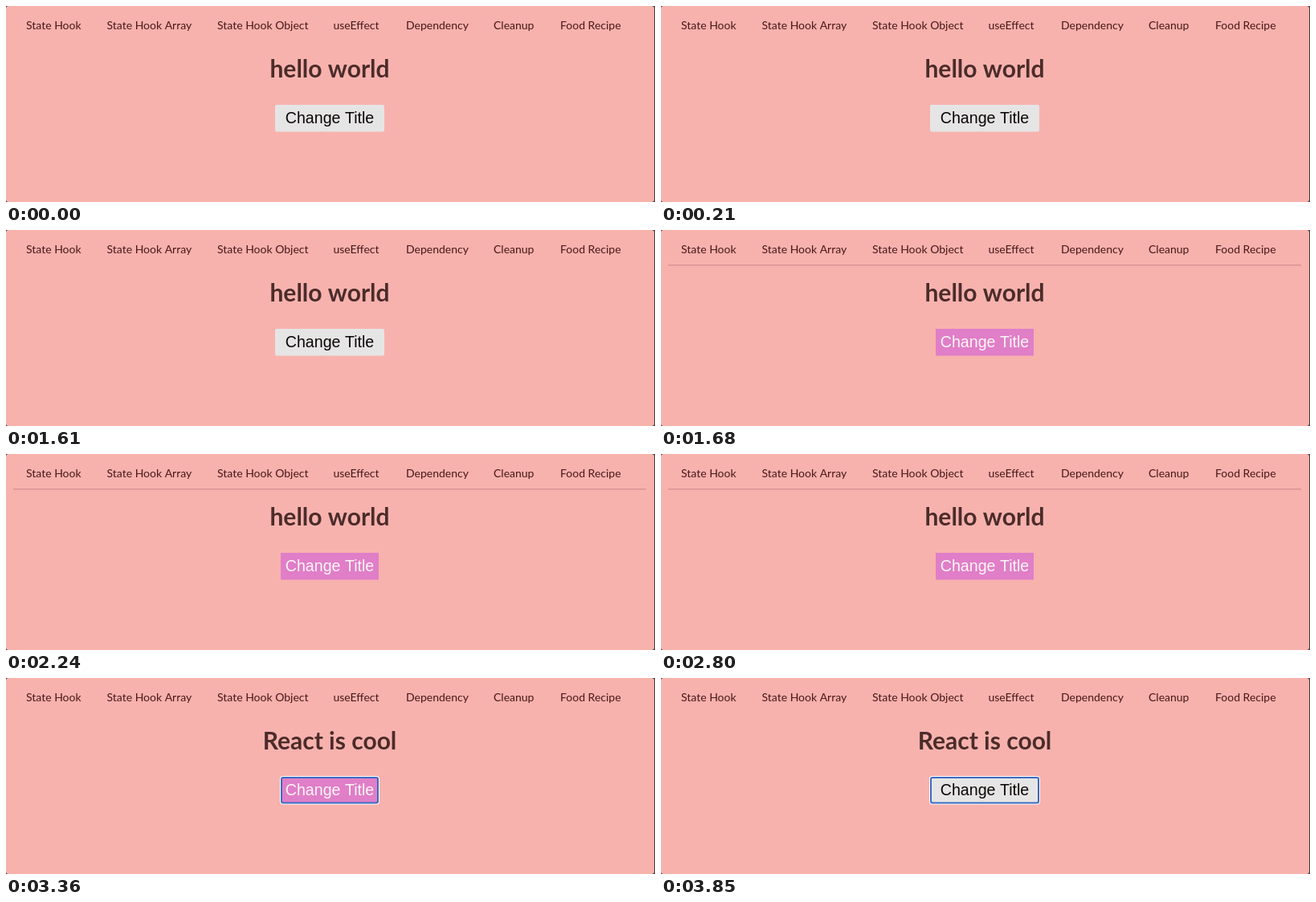
Recreate the animation shown at these times as an HTML page with a canvas. Size 808 by 244 pixels, loop 4.06 s.

```html
<!DOCTYPE html>
<html lang="en">
<head>
<meta charset="utf-8">
<title>Change Title</title>
<style>
  html, body { margin: 0; width: 100%; height: 100%; overflow: hidden; background: #f7b2ae; }
  canvas { display: block; width: 808px; height: 244px; }
</style>
</head>
<body>
<canvas id="stage" width="808" height="244"></canvas>
<script>
const ctx = document.getElementById('stage').getContext('2d');

const LOOP = 4060;
const HOVER = 1680, CLICK = 2870, LEAVE = 3430;

const NAV = [
  ['State Hook', 25], ['State Hook Array', 125.5], ['State Hook Object', 263],
  ['useEffect', 407.5], ['Dependency', 498], ['Cleanup', 607], ['Food Recipe', 690]
];

function box(x, y, w, h, r, color) {
  ctx.fillStyle = color;
  ctx.beginPath();
  ctx.roundRect(x, y, w, h, r);
  ctx.fill();
}

function text(str, x, y, font, color, align = 'left') {
  ctx.font = font;
  ctx.fillStyle = color;
  ctx.textAlign = align;
  ctx.fillText(str, x, y);
}

function drawPage(ruled) {
  box(0, 0, 808, 244, 0, '#4b3634');
  box(0, 0, 807, 244, 3, '#f7b2ae');
  for (const [label, x] of NAV) {
    text(label, x, 29, '14px Lato, sans-serif', '#4a1716');
  }
  if (ruled) box(9, 43, 788, 1.4, 0, '#d99694');
}

function drawButton(hovered, focused) {
  const w = hovered ? 122 : 136;
  const x = 403 - w / 2, y = 123, h = 33.5;
  if (focused) {
    box(x - 1, y - 1, w + 2, h + 2, 4, '#fff');
    box(x, y, w, h, 3, '#3c6cc0');
    box(x + 2, y + 2, w - 4, h - 4, 1, hovered ? '#e07ec8' : '#e6e5e5');
  } else {
    box(x, y, w, h, hovered ? 0 : 2, hovered ? '#e07ec8' : '#e6e5e5');
  }
  text('Change Title', 403, 146, '19.6px "Liberation Sans", Arial, sans-serif',
    hovered ? '#fff6f4' : '#0c0606', 'center');
}

function render(t) {
  const hovered = t >= HOVER && t < LEAVE;
  const clicked = t >= CLICK;
  drawPage(hovered && !clicked);
  text(clicked ? 'React is cool' : 'hello world', 403, 89,
    'bold 30px Lato, sans-serif', '#4b2c2a', 'center');
  drawButton(hovered, clicked);
}

const start = performance.now();
function tick() {
  render((performance.now() - start) % LOOP);
  requestAnimationFrame(tick);
}
tick();
</script>
</body>
</html>
```
